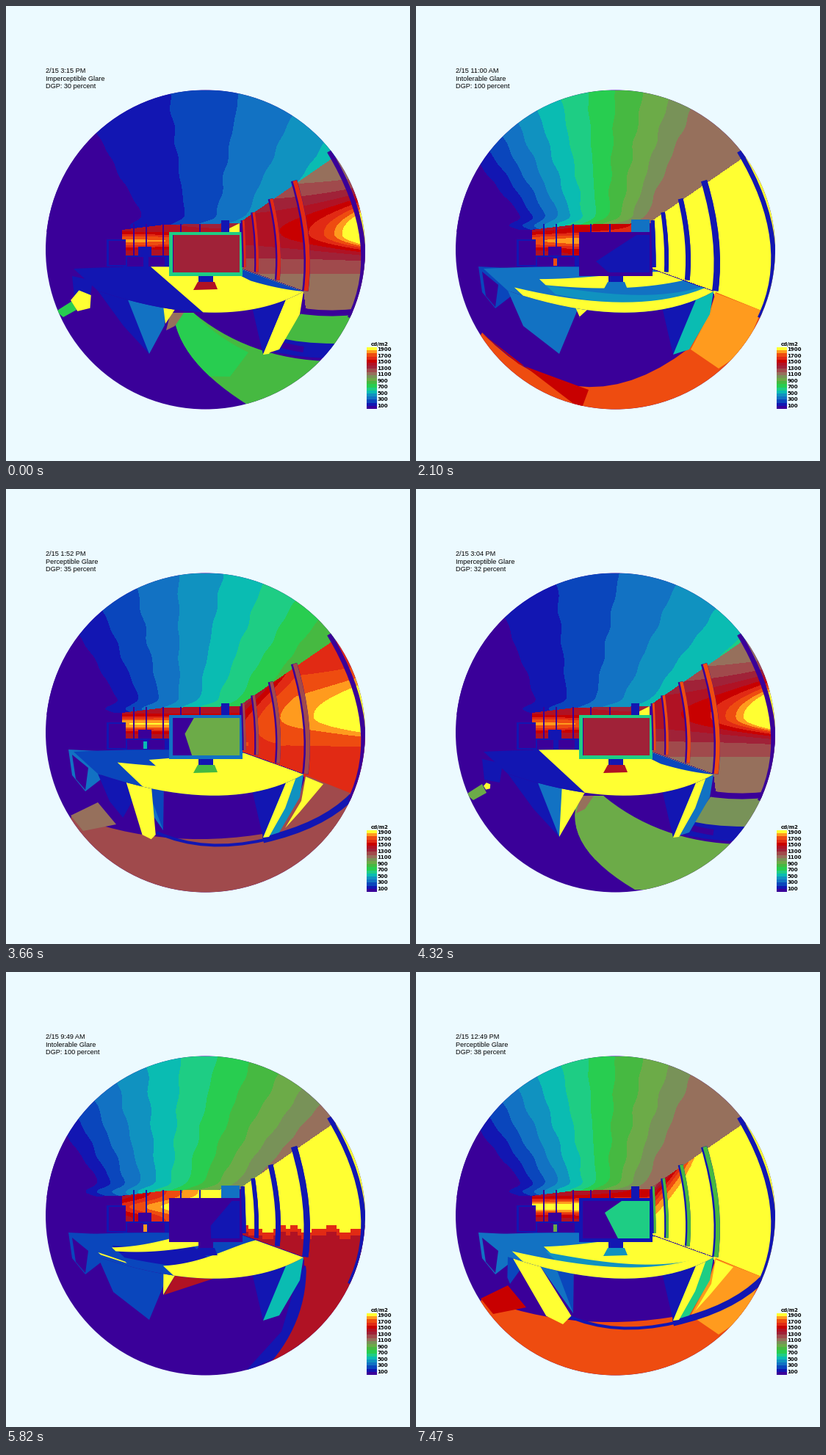
Recreate the animation shown at these times as a matplotlib script. Size 550 px wide and 620 px high, loop 7.5 s.

```python
import numpy as np
import matplotlib.pyplot as plt
from matplotlib.animation import FuncAnimation
from matplotlib.colors import to_rgb
from matplotlib.patches import Circle, PathPatch, Polygon
from matplotlib.path import Path

W, H, DPI = 550, 620, 100
FRAMES, STEP = 250, 30
DAY_START, DAY_LEN = 480, 485        # minutes

PALETTE = np.array([to_rgb("#" + c) for c in (
    "3a0099 1216b2 0a46bc 1272c3 1092c0 0abcb2 1ecd84 28cd50 46b941 6cab48 "
    "789258 96705c a04a4c a02238 b01224 c80000 e12a14 ee4c10 ff9b1e ffff32"
).split()])


def color(level):
    return PALETTE[np.clip(np.floor(level + 1e-6), 0, 19).astype(int)]


def ease(m, keyed):
    """Linear interpolation in a dict of minute -> number or tuple; constants pass."""
    if not isinstance(keyed, dict):
        return np.asarray(keyed, float)
    ks = list(keyed)
    vals = np.array([keyed[k] for k in ks], float)
    i = int(np.clip(np.searchsorted(ks, m), 1, len(ks) - 1))
    f = np.clip((m - ks[i - 1]) / (ks[i] - ks[i - 1]), 0, 1)
    return vals[i - 1] * (1 - f) + vals[i] * f


def bezier(a, b, c, u):
    a, b, c = np.array([a, b, c], float)
    u = np.atleast_1d(u)[:, None]
    return a * (1 - u) ** 2 + 2 * b * u * (1 - u) + c * u ** 2


def curve(a, b, c):
    return bezier(a, b, c, np.linspace(0, 1, 16))


fig = plt.figure(figsize=(W / DPI, H / DPI), dpi=DPI, facecolor="#ecfaff")
ax = fig.add_axes([0, 0, 1, 1])
ax.axis("off")
disc = Circle((271.5, 332), 217.5, fc=PALETTE[0], ec="none", zorder=0)
ax.add_patch(disc)

# Banded surfaces: ceiling, side windows, back windows
X0, X1, Y0, Y1 = 53, 491, 115, 426
X, Y = np.meshgrid(np.arange(X0, X1) + .5, np.arange(Y0, Y1) + .5)


def inside(*pts):
    return Path(pts).contains_points(np.c_[X.ravel(), Y.ravel()]).reshape(X.shape)


ceiling = inside((40, 308), (150, 305), (320, 296), (445, 211), (500, 200), (500, 100), (40, 100))
panes = inside((321, 293), (445, 207), (500, 200), (500, 400), (469, 425), (408, 412),
               (405, 388), (322, 358))
back = inside((158, 305), (215, 298), (318, 296), (318, 345), (158, 345))

# Ceiling bands fan out from a point: x, first slope, slope step, step power
FAN = {480: (310, -.6, .2, 1), 565: (203, -.6, .13, 1.1), 660: (254, -.8, .1225, 1),
       769: (254, -.8, .1225, 1), 904: (218, -.39, .3, .95), 915: (262, -.55, .42, .8),
       965: (300, -.55, .6, .8)}
wobble = 25 * np.exp(-((Y - 300) / 8) ** 2) + 2 * np.sin(Y / 7) * np.sin(X / 11)
jag = 350 + 5 * np.round(np.sin(X / 9) + .6 * np.sin(X / 4))
depth = np.maximum(Y - 292 + .69 * (X - 322), 0)
shade = np.clip((395 - X) / 70, 0, 1) * np.exp(-depth / 28)
ridge = np.exp(-((Y - 305) / 55) ** 2)
spot = np.exp((X - 484) / 45) * np.exp(-((Y - 312) / np.where(Y < 312, 45, 18)) ** 2)
glow = np.exp(-((Y - 320) / 10) ** 2)


def surfaces(m):
    x, first, step, power = ease(m, FAN)
    slope = (X + wobble - x) / (425 - np.minimum(Y, 310))
    turn = (slope - first) / step
    level = np.where(turn > 0, 1 + np.maximum(turn, 0) ** (1 / power), 0)
    level = np.minimum(level, 11.5)

    low = ease(m, {565: 15, 589: 14.6, 625: 17, 655: 21})
    day = 21 - ease(m, {660: 0, 760: 9}) * shade
    day = np.where(Y > jag + 9, low, np.where(Y > jag, np.maximum(low, 16), day))
    dusk = 11 + 3.3 * ridge + ease(m, {904: 11, 915: 8.5, 965: 4}) * spot
    mix = ease(m, {769: 1, 880: .15, 904: 0})
    level[panes] = (dusk + (day - dusk) * mix)[panes]

    tilt = ease(m, {565: 3.5, 660: .8, 904: -.2})
    lift = ease(m, {565: 2, 769: 5.5, 904: 4})
    level[back] = (14.2 + tilt * (X - 160) / 60 + lift * glow)[back]
    return np.dstack([color(level), ceiling | panes | back])


scene = ax.imshow(surfaces(915), extent=(X0, X1, Y1, Y0), interpolation="nearest", zorder=1)
scene.set_clip_path(disc)

AM, NOON, PM, ALL = (0, 625), (625, 850), (850, 1440), (0, 1440)
shapes, strokes = [], []


def shape(pts, level, on=ALL):
    """Filled outline; pts is a list or a function of the minute."""
    patch = ax.add_patch(Polygon([(0, 0)] * 3, closed=True, lw=0, zorder=2))
    patch.set_clip_path(disc)
    shapes.append((patch, pts if callable(pts) else lambda m: pts, level, on))


def box(x0, y0, x1, y1, level, on=ALL):
    shape([(x0, y0), (x1, y0), (x1, y1), (x0, y1)], level, on)


def stroke(a, b, c, width, level, on=ALL, z=2):
    patch = ax.add_patch(PathPatch(Path([a, b, c], [1, 3, 3]), fill=False,
                                   lw=width * .72, capstyle="butt", zorder=z))
    patch.set_clip_path(disc)
    strokes.append((patch, level, on))


# Back of the room
for x in (174, 191, 214, 238, 264):
    box(x - 1, 297, x + 1, 342, {660: 1, 904: 0})
box(160, 340, 222, 358, 1)
for x in (176, 205):
    box(x - 11, 342, x + 11, 355, 0)
box(187, 344, 192, 354, {565: 19, 660: 17, 904: 1})
box(180, 328, 198, 340, {565: 0, 904: 1})
box(137, 318, 163, 355, {565: 2, 904: 1})
box(140, 320, 163, 353, 0)
box(293, 291, 318, 310, 3, (0, 700))
box(293, 292, 304, 308, 1, (700, 1440))
shape([(304, 303), (318, 296), (318, 309), (304, 309)], 19, PM)


# Desk surface: u runs left to right, v from back to front
def front(u):
    return bezier((125, 388), (300, 447), (405, 389), u)


def rim(u0, u1):
    return front(np.linspace(u0, u1, 14))


def strip(u0, u1, back0, back1, front0, front1):
    u, f = np.linspace(u0, u1, 20), np.linspace(0, 1, 20)[:, None]
    far, near = bezier((92, 358), (210, 352), (322, 359), u), front(u)
    v0, v1 = back0 + (back1 - back0) * f, front0 + (front1 - front0) * f
    return np.r_[far + (near - far) * v0, (far + (near - far) * v1)[::-1]]


# Floor, morning
SUNNY = {565: 11.5, 589: 14.5}
shape([(398, 412), (408, 400), (416, 450), (400, 510), (325, 545), (375, 490)],
      {565: 2, 589: 1}, AM)
shape(lambda m: np.r_[curve((397, 420), (390, 490), (322, 545)),
                      curve((365, 528), (395, 490), (400, 440))], SUNNY, (0, 580))
shape(lambda m: np.r_[curve((408, 386), (415, 470), (ease(m, {565: 405, 589: 358}), 535)),
                      [(500, 500), (490, 376)]], SUNNY, AM)

# Floor, midday
RING = {769: 17, 850: 11}


def ring(m):
    sag = ease(m, {660: 582, 760: 496})
    return np.r_[curve((90, 445), (222, sag), (372, 466)),
                 [(400, 415), (408, 390), (470, 415), (520, 520), (271, 600), (40, 540)]]


shape(ring, RING, NOON)
shape(lambda m: [(88, 445), ease(m, {660: (140, 488), 760: (125, 427)}),
                 ease(m, {660: (235, 523), 760: (150, 457)}),
                 ease(m, {660: (225, 550), 760: (105, 466)})], {769: 15, 850: 10}, NOON)
shape([(374, 468), (400, 418), (408, 391), (470, 415), (448, 470), (412, 494)],
      {769: 18, 850: 11}, NOON)
shape([(402, 425), (408, 392), (432, 402), (400, 440), (380, 462)], 19, (700, 850))
stroke((471, 419), (430, 460), (350, 478), 9, 1, (700, 850))
stroke((352, 478), (270, 497), (205, 468), 4, 1, (700, 850))

# Floor, afternoon
GRASS = {904: 9.6, 915: 8, 965: 6}


def lobe_edge(m):
    a, b, c = ease(m, {904: (222, 195, 298), 915: (228, 234, 333)})
    return curve((a, 418), (b, 485), (c, 546))


shape(lambda m: np.r_[lobe_edge(m), [(420, 546)],
                      curve((436, 484), (330, 480), (255, 418))], GRASS, PM)
shape(lambda m: np.r_[lobe_edge(m)[:11], [(305, 505), (330, 472)],
                      curve((330, 472), (285, 450), (255, 418))], {904: 9.4, 915: 7, 965: 5}, PM)
shape([(224, 418), (242, 418), (230, 436), (218, 442)], 11, PM)
shape([(372, 460), (402, 418), (472, 420), (450, 466)], {904: 10, 915: 8, 965: 6}, PM)
stroke((398, 415), (435, 421), (472, 417), 8, 0, PM)
stroke((366, 461), (400, 470), (448, 470), 20, 1, PM)
stroke((376, 462), (390, 466), (405, 468), 8, 0, PM)

# Left side
shape([(85, 355), (125, 357), (130, 395), (108, 412), (90, 390)], {660: 2, 760: 3}, (0, 850))
shape([(90, 362), (112, 380), (108, 410), (95, 395)], {565: 1, 660: 0}, (0, 850))
shape([(108, 412), (126, 401), (130, 412)], 19, (0, 580))
shape([(90, 368), (118, 374), (114, 400), (93, 396)], 1, PM)
shape([(68, 416), (90, 402), (96, 414), (78, 424)], {904: 9, 915: 7}, PM)
corners = np.arange(5) * 2 * np.pi / 5 + .7
shape(lambda m: ease(m, {904: (97, 405), 915: (103, 402)})
      + ease(m, {904: 5, 915: 15}) * np.c_[np.cos(corners), np.sin(corners)], 19, PM)

# Desk front and legs
shape(lambda m: np.r_[rim(0, ease(m, {660: .29, 760: .09, 769: .07, 904: .29})),
                      [ease(m, {660: (195, 474), 760: (150, 455), 769: (128, 425),
                                904: (195, 474)}), (ease(m, {660: (146, 436), 760: (122, 415),
                                                             904: (160, 436)}))]],
      {565: 2, 660: 3.6, 760: 2.4, 904: 1})
shape(np.r_[rim(.12, .28), [(216, 435), (195, 474)]], 3, PM)
shape(np.r_[rim(.13, .27), [(214, 465)]], 3, (730, 850))
shape(np.r_[rim(.2, .27), [(214, 465)]], 2, (730, 850))
shape(np.r_[rim(.7, .9), [(350, 475)]], 1)
shape(lambda m: np.r_[rim(.32, ease(m, {565: .58, 589: .5})),
                      ease(m, {565: (203, 463), 589: (215, 440)})[None]],
      {565: 12, 589: 14}, AM)


def side_glint(m):
    u0, u1, x, y = ease(m, {565: (.25, .32, 203, 463), 589: (.27, .32, 214, 440),
                            660: (.28, .33, 222, 424), 760: (.07, .13, 208, 478),
                            769: (.02, .13, 200, 480), 904: (.22, .32, 195, 474),
                            915: (.27, .32, 217, 433)})
    bulge = 60 * (.32 - u1)
    return np.r_[rim(u0, u1), [(x + bulge, y - bulge), (x, y), (x - 2 * bulge, y - bulge)]]


shape(side_glint, 19)
shape(np.r_[rim(.89, 1), [(400, 420), (372, 468), (350, 475)]],
      {565: 3.5, 589: 5, 769: 6, 904: 3, 915: 19})
shape(np.r_[rim(.89, .95), [(380, 435), (358, 474), (350, 475)]], 19, (764, 1440))

# Desk top and its patches of sun
SUN_FRONT = {565: (.4, 1, .8, 0, 1, 1), 660: (.06, 1, .7, .85, 1, 1),
             769: (.06, 1, .62, .88, 1, 1), 904: (.32, 1, 0, 0, 1, 1),
             915: (.45, 1, 0, 0, 1, 1)}
SUN_BACK = {565: (.1, .55, .45, 0, .55, .2), 660: (.25, 1, .3, .1, .45, .5),
            760: (.25, 1, .35, .05, .5, .92), 904: (.5, 1, .1, 0, .4, .9)}
shape(strip(0, 1, 0, 0, 1, 1), {565: 2.4, 660: 3.4, 769: 3.4, 904: 1})
shape(strip(.15, .6, .35, .3, .7, .8), 1, AM)
shape(strip(.25, 1, .45, .8, .68, 1), 4.6, (625, 850))
for sun in (SUN_BACK, SUN_FRONT):
    shape(lambda m, sun=sun: strip(*ease(m, sun)), 19)
shape(strip(.03, .13, .72, .85, .82, .9), 19, AM)
shape(strip(.9, 1, .1, 0, .4, 1), 2, PM)

# Window mullions, larger toward the viewer
EDGE = {769: 1, 904: 0}
FACE = {690: 1, 760: 8, 769: 8, 904: 17, 915: 16.5}
for x in (322, 336, 360, 392):
    d = x - 322
    low_x, low_y = x + 2 + .19 * d, 356 + .46 * d
    for off, width, level in ((0, 5 + .05 * d, EDGE), (1.2, 3 + .04 * d, FACE)):
        stroke((x + off, 292 - .771 * d), (low_x + .13 * d + off, (292 + low_y) / 2 - .3 * d),
               (low_x + off, low_y), width, level, z=3)
stroke((440, 198), (516, 325), (468, 425), 6.5, EDGE, z=3)

# Monitor
box(262, 368, 282, 376, {589: 0, 660: 1, 904: 1})
shape([(261, 376), (284, 376), (288, 386), (255, 387)], {565: 1, 660: 3, 769: 4, 904: 14.5})
box(222, 308, 322, 368, {660: 0, 760: 1, 769: 1, 850: 4, 904: 6.2})
box(227, 312, 318, 363, 0)


def reflection(m):
    low, x, y, top = ease(m, {565: (285, 290, 345, 310), 660: (262, 245, 348, 300),
                              760: (228, 228, 350, 300), 769: (275, 257, 328, 280),
                              904: (228, 228, 340, 228)})
    return [(low, 363), (x, y), (top, 312), (318, 312), (318, 363)]


shape(reflection, {660: 1, 760: 5.2, 769: 6.2, 904: 13})

# Legend and captions
ax.imshow(PALETTE[::-1, None], extent=(491, 504.5, 549, 465), interpolation="nearest", zorder=4)
legend = dict(family="DejaVu Sans", weight="bold", size=5, color="black", va="center")
ax.text(497, 460.5, "cd/m2", **legend)
for i in range(10):
    ax.text(505.5, 545 - 8.55 * i, str(100 + 200 * i), **legend)
lines = [ax.text(54.5, 91.3 + 10.4 * i, "", family="Liberation Sans", size=6.6, color="black",
                 va="baseline") for i in range(3)]

ax.set_xlim(0, W)
ax.set_ylim(H, 0)
ax.set_aspect("auto")

CLOCK = {0: 0, 42: 135, 70: 230, 100: 330, 144: 474, 194: 644, 249: 824}
GLARE = {480: 60, 530: 100, 690: 100, 735: 45, 760: 37, 769: 38, 904: 32, 915: 30, 965: 24}


def rating(dgp):
    for limit, name in ((35, "Imperceptible"), (40, "Perceptible"), (45, "Disturbing")):
        if dgp < limit:
            return name
    return "Intolerable"


def update(i):
    m = DAY_START + (915 - DAY_START + float(ease(i, CLOCK))) % DAY_LEN
    scene.set_data(surfaces(m))
    for patch, pts, level, (a, b) in shapes:
        patch.set_visible(a <= m < b)
        if a <= m < b:
            patch.set_xy(pts(m))
            patch.set_facecolor(color(ease(m, level)))
    for patch, level, (a, b) in strokes:
        patch.set_visible(a <= m < b)
        patch.set_edgecolor(color(ease(m, level)))
    hour, minute = divmod(int(round(m)), 60)
    dgp = int(round(float(ease(m, GLARE))))
    lines[0].set_text(f"2/15 {(hour - 1) % 12 + 1}:{minute:02d} {'AM' if hour < 12 else 'PM'}")
    lines[1].set_text(f"{rating(dgp)} Glare")
    lines[2].set_text(f"DGP: {dgp} percent")
    return []


anim = FuncAnimation(fig, update, frames=FRAMES, init_func=lambda: update(0),
                     interval=STEP, repeat=True, repeat_delay=0)
plt.show()
```
